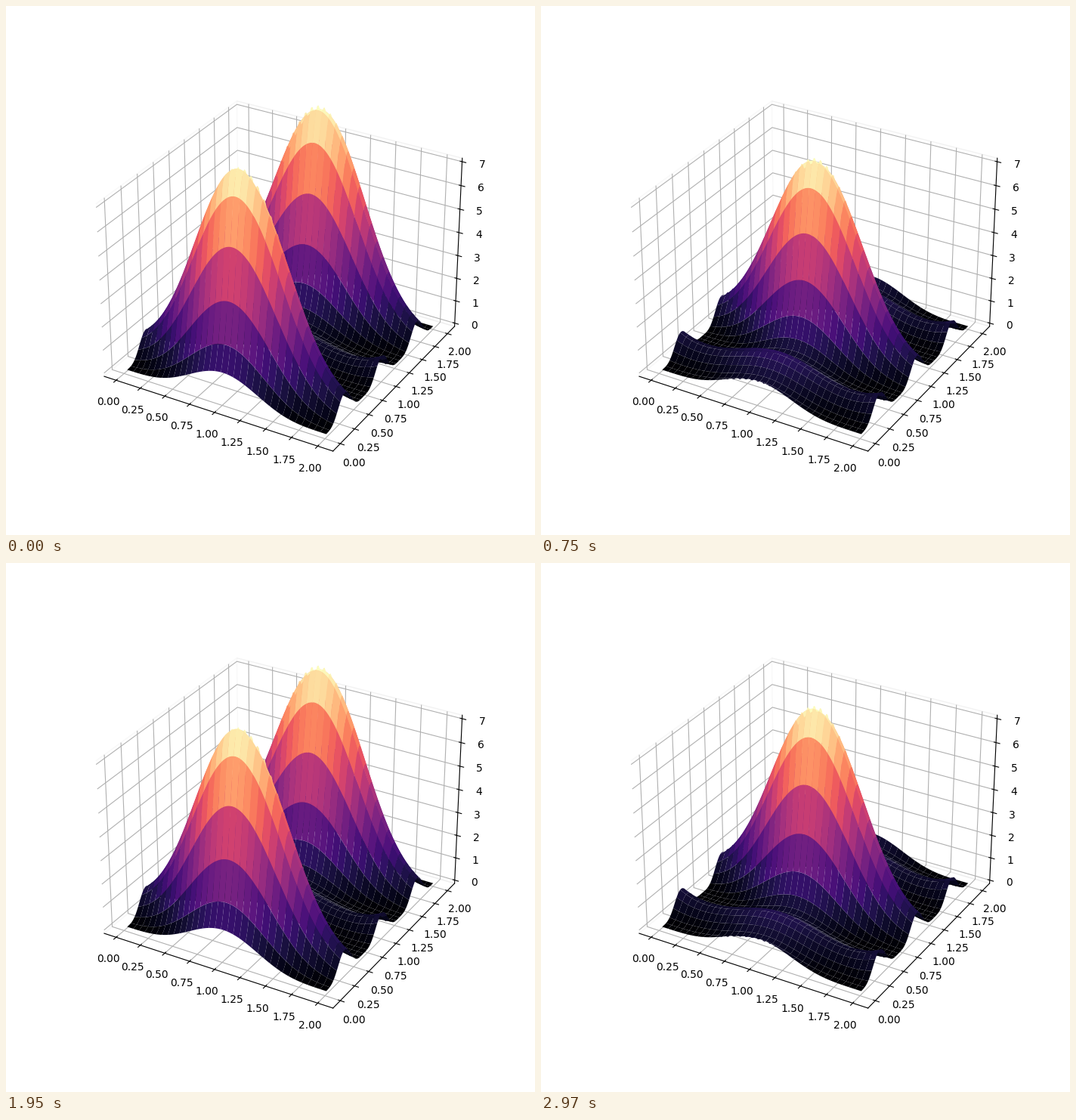
Write a matplotlib script that moves like this. It is 700 by 700 pixels and loops after 3 s.

```python
import numpy as np
import matplotlib.pyplot as plt
from matplotlib.animation import FuncAnimation
from mpl_toolkits.mplot3d.art3d import Poly3DCollection

FRAMES, INTERVAL = 100, 30
L, N, STRIDE = 2.0, 100, 3
DT = 0.01
OMEGA = (3**2 - 1**2) * np.pi**2 / (2 * L**2)

axis = np.linspace(L / N, L, N)
X, Y = np.meshgrid(axis, axis)
A = np.sin(np.pi * X / L)
B = np.sin(3 * np.pi * Y / L)


def density(t):
    return (A**2 + B**2 + A * B * np.cos(OMEGA * t))**2


def patch_indices():
    """Flat grid indices around the rim of every STRIDE x STRIDE patch."""
    s = np.arange(STRIDE)
    zero, full = np.zeros(STRIDE, int), np.full(STRIDE, STRIDE)
    rows = np.concatenate([zero, s, full, STRIDE - s])
    cols = np.concatenate([s, full, STRIDE - s, zero])
    start = np.arange(0, N - 1, STRIDE)
    r0, c0 = np.meshgrid(start, start, indexing="ij")
    return (r0.reshape(-1, 1) + rows) * N + c0.reshape(-1, 1) + cols


RIM = patch_indices()
RIM_X, RIM_Y = X.ravel()[RIM], Y.ravel()[RIM]


def patches(t):
    z = density(t).ravel()[RIM]
    return np.stack([RIM_X, RIM_Y, z], axis=-1), z.mean(axis=1)


def padded(lo, hi, margin):
    pad = (hi - lo) * margin
    return lo - pad, hi + pad


fig = plt.figure(figsize=(7, 7), dpi=100)
ax = fig.add_subplot(projection="3d")
for a in (ax.xaxis, ax.yaxis, ax.zaxis):
    a.pane.set_fill(False)

ticks = np.arange(0, L + 0.1, 0.25)
ax.set_xticks(ticks)
ax.set_yticks(ticks)
ax.set_zticks(range(8))
side = padded(*padded(axis[0], axis[-1], 0.05), 1 / 48)
ax.set_xlim(*side)
ax.set_ylim(*side)
ax.set_zlim(*padded(0, 7, 1 / 48))

verts, heights = patches(DT)
surface = Poly3DCollection(verts, cmap="magma", linewidth=0)
surface.set_array(heights)
ax.add_collection3d(surface)


def update(i):
    verts, heights = patches((i + 1) * DT)
    surface.set_verts(verts)
    surface.set_array(heights)
    surface.set_clim(heights.min(), heights.max())
    return surface,


anim = FuncAnimation(fig, update, frames=FRAMES, interval=INTERVAL,
                     repeat=True, repeat_delay=0)
plt.show()
```
